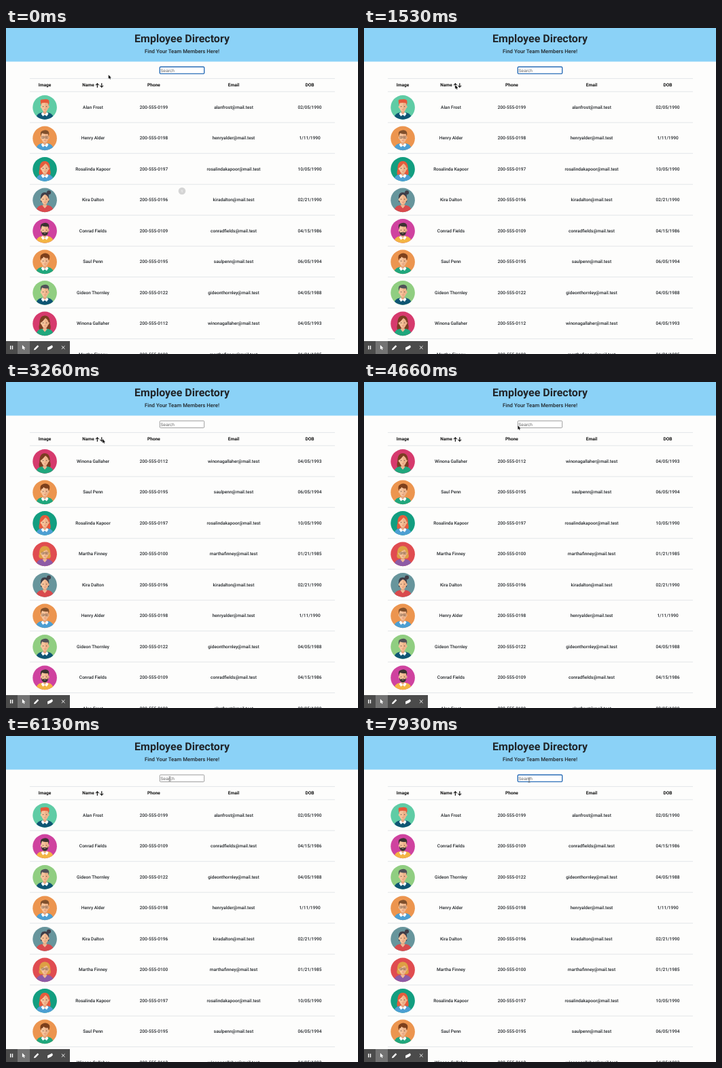
Animation of 518 by 480 pixels, one loop 8000 ms. Source, as an HTML page:

```html
<!DOCTYPE html>
<html lang="en">
<head>
<meta charset="utf-8">
<title>Employee Directory</title>
<style>
  html, body { margin: 0; width: 100%; height: 100%; overflow: hidden; background: #fdfdfc; }
  svg { display: block; width: 518px; height: 480px; }
  text { font: 500 6.55px Roboto, sans-serif; fill: #212529; text-anchor: middle; text-rendering: geometricPrecision; }
  .title { font-size: 16px; font-weight: 700; }
  .subtitle { font-size: 7.8px; }
  .head { font-weight: 700; fill: #111; }
  .placeholder { font: 6.5px "Liberation Sans", Arial, sans-serif; fill: #626262; text-anchor: start; }
  .badge { font-size: 5px; fill: #fff; }
</style>
</head>
<body>
<svg id="stage" viewBox="0 0 518 480"></svg>
<script>
const LOOP = 8000, ROW = 45.5, FIRST_ROW = 116.6;
const COLUMNS = { Image: 57, Name: 121, Phone: 217.5, Email: 335, DOB: 447 };

// name, phone suffix, birthday, background, hair, clothes, hair style, extras
const people = [
  ['Alan Frost', '0199', '02/05/1990', '#5fcca5', '#e6593a', '#0f5674', 'flat', ''],
  ['Henry Alder', '0198', '1/11/1990', '#ec954f', '#80502c', '#4c9fd3', 'short', 'glasses'],
  ['Rosalinda Kapoor', '0197', '10/05/1990', '#129e80', '#e65b3c', '#4c9fd3', 'long', ''],
  ['Kira Dalton', '0196', '02/21/1990', '#67959c', '#403e48', '#d94a4d', 'bun', 'bare'],
  ['Conrad Fields', '0109', '04/15/1986', '#cf429f', '#3b3331', '#f3b544', 'short', 'beard'],
  ['Saul Penn', '0195', '06/05/1994', '#ec954f', '#7d401c', '#20a77d', 'swept', ''],
  ['Gideon Thornley', '0122', '04/05/1988', '#90ce81', '#505258', '#0f5674', 'short', ''],
  ['Winona Gallaher', '0112', '04/05/1993', '#d63a6d', '#7b3d22', '#20a77d', 'long', 'bare'],
  ['Martha Finney', '0100', '01/21/1985', '#e04c50', '#dda044', '#8d5ba6', 'bob', 'glasses bare']
];

const hairFront = {
  flat: 'M-6.4-3L-7-9Q-8-13-3-12.4Q4-14.5 6.8-11Q7.8-8 6.4-3L5-6.6Q0-8-5-6.6Z',
  short: 'M-6.4-3Q-8.6-11-3-12.2Q4-14.5 6.5-10Q7.6-7 6.4-3L5-7Q0-6-4.6-8Z',
  swept: 'M-6.4-2Q-9.5-10-4-12.6Q3-16 7-11Q9.4-7 6.4-2L5-6Q0-5-2-8Q-3-5-5.4-5Z',
  long: 'M-6.4-1Q-7-12 0-12.4Q7-12 6.4-1Q5-7 1-9Q-2-5-6.4-1Z',
  bun: 'M-6.4-2Q-8-12 0-12Q8-12 6.4-2Q5-7 0-9Q-4-7-6.4-2Z',
  bob: 'M-6.4-1Q-7-12 0-12.4Q7-12 6.4-1Q5-5 3-7Q-3-4-6.4-1Z'
};
const hairBack = {
  long: 'M-7 11Q-11 8-8.4 0Q-8.6-13 0-13Q8.6-13 8.4 0Q11 8 7 11Z',
  bun: 'M-6.4 3Q-8-12 0-12Q8-12 6.4 3ZM3.2-12A3.3 3.3 0 1 1 9.8-12A3.3 3.3 0 1 1 3.2-12Z',
  bob: 'M-6 7Q-11 6-9 0Q-9-13 0-13Q9-13 9 0Q11 6 6 7Z'
};

const shape = (d, fill, more = '') => `<path d="${d}" fill="${fill}" ${more}/>`;
const label = (x, y, text, type = '') => `<text x="${x}" y="${y}" class="${type}">${text}</text>`;
const line = y => `<rect x="35" y="${y}" width="449" height="1" fill="#e3e6e9"/>`;

function avatar(back, hair, clothes, style, extras) {
  const has = word => extras.includes(word);
  return `<circle r="17.8" fill="${back}"/><g clip-path="url(#disc)">`
    + shape(hairBack[style] || '', hair, 'transform="scale(.92)"')
    + shape('M-13.5 18Q-13 9.4-5 7.6H5Q13 9.4 13.5 18Z', clothes)
    + shape('M-2.5 3H2.5V8.6L0 11.5L-2.5 8.6Z', '#e5a984')
    + (has('bare') ? shape('M-3.6 7.8H3.6L0 12Z', '#efb892')
      : shape('M-3.2 7L0 10.6L3.2 7L5.4 9.4L2.8 13.2L0 10.8L-2.8 13.2L-5.4 9.4Z', '#fff'))
    + '<g transform="translate(0 -.4) scale(.9)">'
    + shape('M-5.7-5Q-5.7-10 0-10Q5.7-10 5.7-5V-2Q7.4-3 7 0Q6.6 2 5.3 2Q4 7 0 7Q-4 7-5.3 2Q-6.6 2-7 0Q-7.4-3-5.7-2Z', '#f6c39b')
    + shape('M0-10Q5.7-10 5.7-5V-2Q7.4-3 7 0Q6.6 2 5.3 2Q4 7 0 7Z', '#edb38a')
    + (has('beard') ? shape('M-5.7-1L-4.4 3Q0 1.4 4.4 3L5.7-1Q6 8 0 8.3Q-6 8-5.7-1Z', hair) : '')
    + shape(hairFront[style], hair)
    + shape('M-3.4-1.7h1.3v1.3h-1.3ZM2.1-1.7h1.3v1.3h-1.3Z', '#6d5145')
    + shape('M-1.8 3.6H1.8Q0 5.4-1.8 3.6Z', has('beard') ? '#f3d4c4' : '#d9655c')
    + (has('glasses') ? shape('M-5-2.7h4v3.2h-4ZM1-2.7h4v3.2h-4ZM-1-1.6H1', 'none', 'stroke="#75604f" stroke-width=".6"') : '')
    + '</g></g>';
}

function personRow([name, suffix, birthday, ...look]) {
  const mail = name.toLowerCase().replace(' ', '') + '@mail.test';
  return `<g class="row"><g transform="translate(57.1 .3)">${avatar(...look)}</g>`
    + label(128, 2.2, name) + label(COLUMNS.Phone, 2.2, '200-555-' + suffix)
    + label(COLUMNS.Email, 2.2, mail) + label(COLUMNS.DOB, 2.2, birthday)
    + line(22.1) + '</g>';
}

const arrowUp = 'M0-3.5L2.8-.6L2-.1L.6-1.5V3.3H-.6V-1.5L-2-.1L-2.8-.6Z';
const pointer = 'M0 0V7.2L1.7 5.7L2.8 8.2L4 7.7L2.9 5.2H5.2Z';

const toolbar = `<g transform="translate(0 461)">
  <rect width="94" height="19" fill="#4b4b4b"/><rect x="17" width="18" height="19" fill="#737373"/>
  <g fill="#fff"><path d="M6 6.8h1.4v5.4H6ZM8.8 6.8h1.4v5.4H8.8Z"/>
  <path d="${pointer}" transform="translate(23.9 5.7) scale(.9)"/>
  <path d="M41 13.2L41.6 10.9L46.5 6L48.3 7.8L43.4 12.7Z"/>
  <path d="M61 9.6L67.8 6L69 8.8L66.5 11.2L61.3 13.4Z"/></g>
  <path d="M81.9 7.1l4.6 4.6m0-4.6l-4.6 4.6" stroke="#fff" stroke-width=".9"/></g>`;

document.getElementById('stage').innerHTML = `
  <defs><clipPath id="disc"><circle r="17.8"/></clipPath></defs>
  <rect width="518" height="480" fill="#fdfdfc"/>
  <rect width="518" height="49.5" fill="#8bd2f7"/>
  ${label(259, 21.4, 'Employee Directory', 'title')}
  ${label(259, 36.9, 'Find Your Team Members Here!', 'subtitle')}
  <rect id="search" x="226.3" y="57.2" width="65.4" height="10.2" rx="1.3" fill="#fff"/>
  ${label(227.2, 64.7, 'Search', 'placeholder')}
  ${line(73.9)}${line(93.3)}
  ${Object.entries(COLUMNS).map(([name, x]) => label(x, 86.4, name, 'head')).join('')}
  ${shape(arrowUp, '#111', 'transform="translate(134.4 84.5)"')}
  ${shape(arrowUp, '#111', 'transform="translate(140.8 84.5) scale(1 -1)"')}
  ${people.map(personRow).join('')}
  ${toolbar}
  <g id="badge"><circle cx="259" cy="240" r="5.3" fill="#d5d5d5"/>${label(259, 241.8, '1', 'badge')}</g>
  <g id="cursor">
    ${shape(pointer, '#111', 'id="arrow" transform="scale(.8)" stroke="#fff" stroke-width=".8" paint-order="stroke"')}
    ${shape('M-1.4-3.4Q0-3.4 0-2.4Q0-3.4 1.4-3.4M0-2.4V2.4M-1.4 3.4Q0 3.4 0 2.4Q0 3.4 1.4 3.4', 'none', 'id="beam" stroke="#444" stroke-width=".6"')}
  </g>`;

const [search, badge, cursor, arrow, beam] =
  ['search', 'badge', 'cursor', 'arrow', 'beam'].map(id => document.getElementById(id));
const rows = [...document.querySelectorAll('.row')];

const unsorted = people.map((_, i) => i);
const ascending = [...unsorted].sort((a, b) => people[a][0] < people[b][0] ? -1 : 1);
const descending = [...ascending].reverse();
const orders = [[0, unsorted], [1700, ascending], [2730, descending], [5830, ascending]];

// time, x, y of the pointer tip
const path = [
  [0, 150.8, 69], [100, 150.8, 69], [800, 134.3, 84], [1900, 134.3, 84], [2250, 142, 84],
  [3350, 142, 84], [4300, 226.4, 64.3], [4750, 226.4, 64.3], [5500, 134.3, 84], [5840, 134.3, 84],
  [6120, 241, 63], [6700, 241, 63], [7100, 243, 65], [LOOP, 243, 65]
];

function pointerAt(t) {
  const next = path.findIndex(p => p[0] > t);
  const [t0, x0, y0] = path[next - 1], [t1, x1, y1] = path[next];
  const u = (t - t0) / (t1 - t0), k = u * u * (3 - 2 * u);
  return [x0 + (x1 - x0) * k, y0 + (y1 - y0) * k];
}

function draw() {
  const t = performance.now() % LOOP;
  const order = orders.findLast(([start]) => t >= start)[1];
  order.forEach((person, i) =>
    rows[person].setAttribute('transform', `translate(0 ${FIRST_ROW + i * ROW})`));

  const focused = t < 1650 || t > 6800;
  search.setAttribute('stroke', focused ? '#2c6fb8' : '#858585');
  search.setAttribute('stroke-width', focused ? 1.4 : .8);
  badge.style.display = t < 60 ? '' : 'none';

  const [x, y] = pointerAt(t);
  const overSearch = x > 227 && x < 291 && y > 57.5 && y < 67.5;
  cursor.setAttribute('transform', `translate(${x} ${y})`);
  arrow.style.display = overSearch ? 'none' : '';
  beam.style.display = overSearch ? '' : 'none';
  requestAnimationFrame(draw);
}
draw();
</script>
</body>
</html>
```
